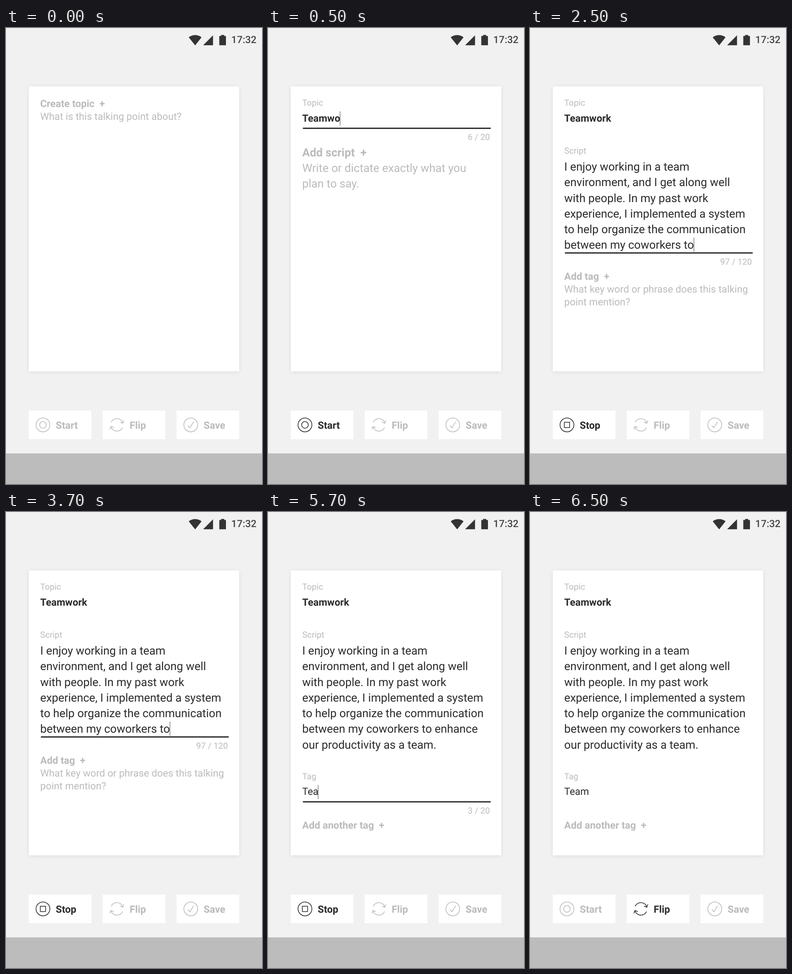
Animation of 561x998 px, one loop 8000 ms. Source, as an HTML page with a canvas:

```html
<!DOCTYPE html>
<html lang="en">
<head>
<meta charset="utf-8">
<title>Talking point card</title>
<style>
  html, body { margin: 0; width: 100%; height: 100%; overflow: hidden; background: #f1f1f1; }
  canvas { display: block; width: 561px; height: 998px; }
</style>
</head>
<body>
<canvas id="stage"></canvas>
<script>
const W = 561, H = 998, LOOP = 8000;
const SP = W / 360;
const BG = '#f1f1f1', DARK = '#2b2b2b', PALE = '#bbbbbb', SOLID = '#333333';
const SMALL = 12 * SP, BODY = 14 * SP, LARGE = 16 * SP;
const LEFT = 75;

const canvas = document.getElementById('stage');
const dpr = window.devicePixelRatio || 1;
canvas.width = Math.round(W * dpr);
canvas.height = Math.round(H * dpr);
const ctx = canvas.getContext('2d');

const SCRIPT = [
  'I enjoy working in a team',
  'environment, and I get along well',
  'with people. In my past work',
  'experience, I implemented a system',
  'to help organize the communication',
  'between my coworkers to enhance',
  'our productivity as a team.'
];

function text(str, x, y, size, color, weight = 400, align = 'left') {
  ctx.font = `${weight} ${size}px Roboto, sans-serif`;
  ctx.textAlign = align;
  ctx.fillStyle = color;
  ctx.fillText(str, x, y);
}

function rect(x, y, w, h, color) {
  ctx.fillStyle = color;
  ctx.fillRect(x, y, w, h);
}

function fillPath(d, color) {
  ctx.fillStyle = color;
  ctx.fill(new Path2D(d));
}

function strokePath(d) {
  ctx.stroke(new Path2D(d));
}

function circle(x, y, r) {
  ctx.beginPath();
  ctx.arc(x, y, r, 0, Math.PI * 2);
  ctx.stroke();
}

function lines(list, y, size, step, color) {
  list.forEach((str, i) => text(str, LEFT, y + i * step, size, color));
}

const label = (str, y) => text(str, LEFT, y, SMALL, PALE);
const prompt = (str, y, size = BODY) => text(str + '  +', LEFT, y, size, PALE, 700);

// Active input: underline, caret and character counter.
function field(lineY, caretX, caretY, count) {
  rect(76.5, lineY - 1.5, 411.5, 3, SOLID);
  rect(caretX - 0.6, caretY, 1.2, 31, '#666666');
  text(count, 486.3, lineY + 25.5, SMALL, PALE, 400, 'right');
}

function statusBar() {
  fillPath('M414.5 38 L400.5 20.6 Q406.5 15.6 414.5 15.6 Q422.5 15.6 428.5 20.6 Z', SOLID);
  fillPath('M432 37.8 L453.7 16 V37.8 Z', SOLID);
  fillPath('M467.4 17.6 H471.3 V15.3 H478.2 V17.6 H482 V37.8 H467.4 Z', SOLID);
  text('17:32', 493.6, 33, BODY, '#444444', 500);
}

function card() {
  ctx.save();
  ctx.shadowColor = 'rgba(0,0,0,0.1)';
  ctx.shadowBlur = 9 * dpr;
  ctx.shadowOffsetY = 1 * dpr;
  rect(49.9, 127.8, 461.2, 623.7, '#ffffff');
  ctx.restore();
}

const icons = {
  Start(x, y) {
    circle(x, y, 15.2);
    circle(x, y, 7.3);
  },
  Stop(x, y) {
    circle(x, y, 15.2);
    ctx.strokeRect(x - 5.8, y - 5.8, 11.6, 11.6);
  },
  Flip(x, y) {
    ctx.save();
    ctx.translate(x, y);
    for (let i = 0; i < 2; i++) {
      strokePath('M-12.2 -6.2 A13.7 13.7 0 0 1 13 -4.2 M7.4 -5.6 L13.2 -3.6 L15 -9.4');
      ctx.rotate(Math.PI);
    }
    ctx.restore();
  },
  Save(x, y) {
    circle(x, y, 15.2);
    strokePath(`M${x - 6} ${y + 2} l4.2 4.6 l7.8 -13`);
  }
};

function button(x, name, active) {
  const color = active ? DARK : PALE;
  rect(x, 837.4, 137.3, 62.4, '#ffffff');
  ctx.strokeStyle = color;
  ctx.lineWidth = 1.5;
  ctx.lineCap = ctx.lineJoin = 'round';
  icons[name](x + 31.1, 868.6);
  text(name, x + 59.2, 876.8, BODY, color, 700);
}

function buttons(first, active) {
  [first, 'Flip', 'Save'].forEach((name, i) => button(49.9 + i * 161.95, name, name === active));
}

function topic(str) {
  label('Topic', 169.9);
  text(str, LEFT, 204.5, BODY, DARK, 700);
}

function script(list) {
  label('Script', 274.7);
  lines(list, 312, LARGE, 22 * SP, DARK);
}

function tag(str) {
  label('Tag', 585);
  text(str, LEFT, 619.3, BODY, DARK);
  prompt('Add another tag', 692.7);
}

const scenes = [
  { at: 0, draw() {
    prompt('Create topic', 173.3);
    lines(['What is this talking point about?'], 201.3, BODY, 0, PALE);
    buttons('Start');
  } },
  { at: 500, draw() {
    topic('Teamwo');
    field(219.5, 158, 182.5, '6 / 20');
    prompt('Add script', 280.8, LARGE);
    lines(['Write or dictate exactly what you', 'plan to say.'], 315.2, LARGE, 22 * SP, PALE);
    buttons('Start', 'Start');
  } },
  { at: 2500, draw() {
    topic('Teamwork');
    script([...SCRIPT.slice(0, 5), 'between my coworkers to']);
    field(492.3, 359.3, 458.8, '97 / 120');
    prompt('Add tag', 550.8);
    lines(['What key word or phrase does this talking', 'point mention?'], 578.8, BODY, 18 * SP, PALE);
    buttons('Stop', 'Stop');
  } },
  { at: 4500, draw() {
    topic('Teamwork');
    script(SCRIPT);
    tag('Tea');
    field(634.3, 109.8, 597.3, '3 / 20');
    buttons('Stop', 'Stop');
  } },
  { at: 6500, draw() {
    topic('Teamwork');
    script(SCRIPT);
    tag('Team');
    buttons('Start', 'Flip');
  } }
];

function render(now) {
  const t = now % LOOP;
  ctx.setTransform(dpr, 0, 0, dpr, 0, 0);
  ctx.textRendering = 'geometricPrecision';
  rect(0, 0, W, H, BG);
  rect(0, 931, W, 67, '#bcbcbc');
  statusBar();
  card();
  scenes.filter(s => s.at <= t).pop().draw();
}

const start = performance.now();
function tick() {
  render(performance.now() - start);
  requestAnimationFrame(tick);
}
tick();
</script>
</body>
</html>
```
